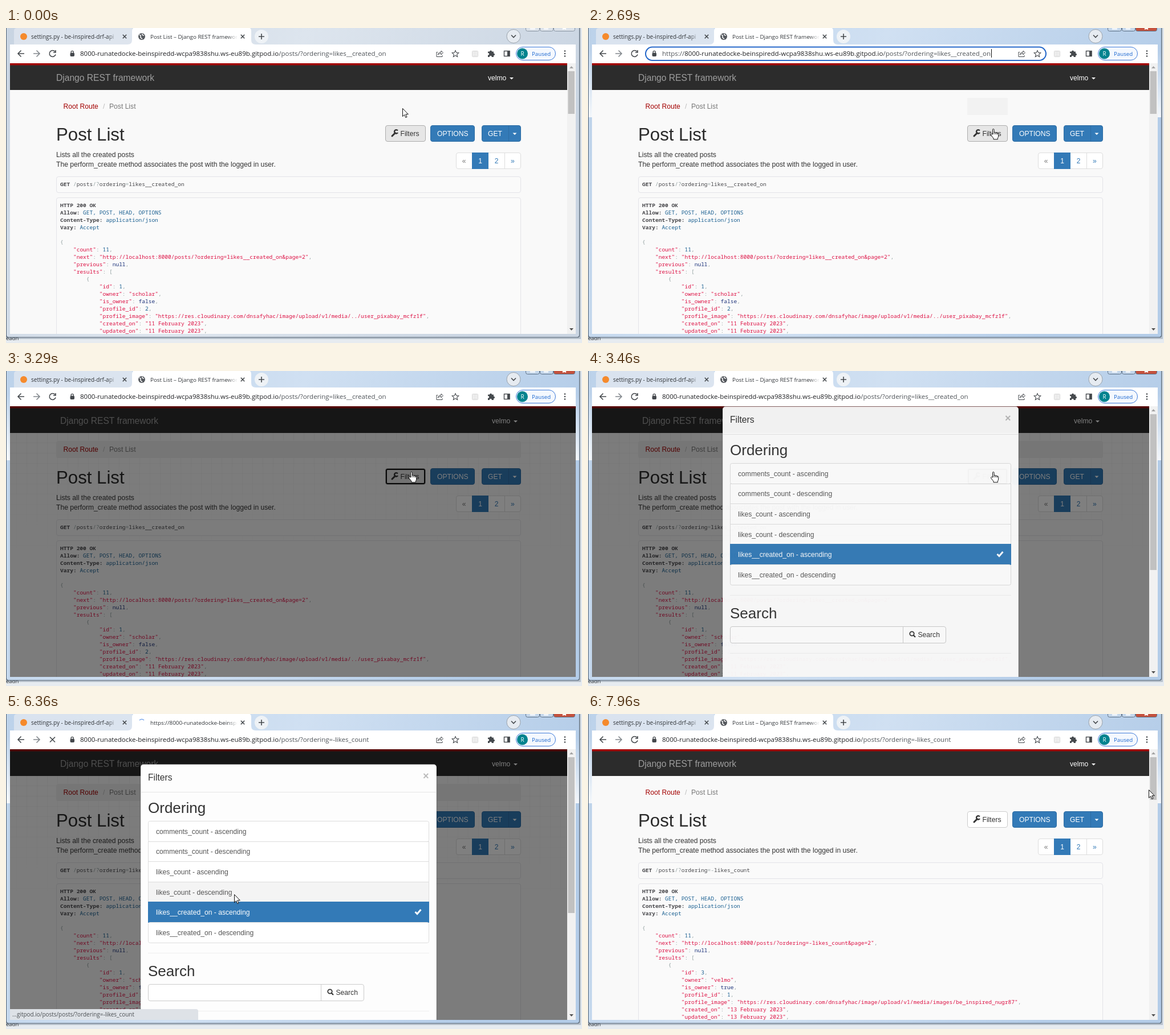
An HTML page that plays this animation: 1010 by 554 pixels, repeating every 8 s.

```html
<!DOCTYPE html>
<html lang="en">
<head>
<meta charset="utf-8">
<title>Post List</title>
<style>
html, body { margin: 0; width: 100%; height: 100%; overflow: hidden; background: #fff; }
svg { display: block; width: 100%; height: 100%; }
text { white-space: pre; font: 12.13px "Liberation Sans", Arial, sans-serif; fill: #333; }
.ui { font-family: "Open Sans", "Noto Sans", sans-serif; fill: #303438; }
.mono { font: 9.56px "Noto Sans Mono", monospace; fill: #48484c; }
.b { font-weight: 700; }
.lit { fill: #195f91; } .pun { fill: #93a1a1; } .str { fill: #d14; } .kwd { fill: #1e347b; }
.ico { fill: none; stroke: #45494d; stroke-width: 1.6; }
</style>
</head>
<body>
<svg id="stage" viewBox="0 0 1010 554" preserveAspectRatio="none"></svg>
<script>
const LOOP = 8000;
const $ = id => document.getElementById(id);
const esc = s => s.replace(/&/g, '&amp;').replace(/</g, '&lt;');
const rect = (x, y, w, h, fill, more = '') =>
  `<rect x="${x}" y="${y}" width="${w}" height="${h}" fill="${fill}" ${more}/>`;
const box = (x, y, w, h, fill, line, r = 3.5, more = '') =>
  rect(x + .5, y + .5, w - 1, h - 1, fill, `stroke="${line}" rx="${r}" ${more}`);
const text = (x, y, s, fill = '#333', size = 12.13, more = '') =>
  `<text x="${x}" y="${y}" style="fill:${fill};font-size:${size}px" ${more}>${esc(s)}</text>`;
const ui = (x, y, s, size, fill = '#303438', more = '') => text(x, y, s, fill, size, `class="ui" ${more}`);
const path = (d, more = 'class="ico"') => `<path d="${d}" ${more}/>`;
const circle = (x, y, r, fill, more = '') => `<circle cx="${x}" cy="${y}" r="${r}" fill="${fill}" ${more}/>`;
const group = (id, inner, more = '') => `<g id="${id}" ${more}>${inner}</g>`;
const cross = (x, y, r) => path(`M${x - r} ${y - r}l${2 * r} ${2 * r}m0 ${-2 * r}l${-2 * r} ${2 * r}`);
const span = (cls, s) => `<tspan class="${cls}">${esc(s)}</tspan>`;

// Colours JSON and request lines by token
function paint(line) {
  return line.replace(/"[^"]*"|\b(?:true|false|null)\b|\b\d+\b|[A-Za-z_]+|[^\w"\s]+|\s+/g, s =>
    s[0] === '"' ? span('str', s) :
    /^(true|false|null)$/.test(s) ? span('kwd', s) :
    /^\d/.test(s) ? span('lit', s) :
    /^[\w\s]/.test(s) ? s : span('pun', s));
}
const mono = (y, inner) => `<text class="mono" x="95" y="${y}" xml:space="preserve">${inner}</text>`;

function listing(p) {
  const pad = n => ' '.repeat(n);
  const json = ['{',
    pad(4) + '"count": 11,',
    pad(4) + `"next": "http://localhost:8000/posts/?ordering=${p.order}&page=2",`,
    pad(4) + '"previous": null,', pad(4) + '"results": [', pad(8) + '{',
    ...[`"id": ${p.id},`, `"owner": "${p.owner}",`, `"is_owner": ${p.own},`, `"profile_id": ${p.profile},`,
      `"profile_image": "https://res.cloudinary.com/dnsafyhac/image/upload/v1/media/${p.image}",`,
      `"created_on": "${p.day} February 2023",`, `"updated_on": "${p.day} February 2023",`].map(s => pad(12) + s)];
  const heads = [['Allow:', 'GET, POST, HEAD, OPTIONS'], ['Content-Type:', 'application/json'], ['Vary:', 'Accept']];
  return mono(278, span('b', 'GET') + paint(` /posts/?ordering=${p.order}`)) +
    mono(315, span('b', 'HTTP 200 OK')) +
    heads.map(([k, v], i) => mono(328 + 13 * i, span('b', k) + ' ' + span('lit', v))).join('') +
    json.map((s, i) => mono(380 + 13 * i, paint(s))).join('');
}

const host = '8000-runatedocke-beinspiredd-wcpa9838shu.ws-eu89b.gitpod.io';
const sorts = ['comments_count', 'likes_count', 'likes__created_on'];
const keys = sorts.flatMap(s => [s, '-' + s]);
const ROW = 35.6, LIST = 188.5;

const fade = (id, x) => `<linearGradient id="${id}" gradientUnits="userSpaceOnUse" x1="${x - 18}" x2="${x}" y1="0" y2="0">
  <stop stop-color="#303438"/><stop offset="1" stop-color="#303438" stop-opacity="0"/></linearGradient>`;
const sheen = (id, a, b, c) => `<linearGradient id="${id}" x2="1" y2=".25">
  <stop stop-color="${a}"/><stop offset=".5" stop-color="${b}"/><stop offset="1" stop-color="${c}"/></linearGradient>`;

const defs = `<defs>${fade('fadeA', 196)}${fade('fadeB', 406)}
  ${sheen('idle', '#c8d4e2', '#dde5ee', '#cad5e2')}${sheen('live', '#bcd2ea', '#d0e0f2', '#b3cce8')}
  <clipPath id="view">${rect(7, 62, 992, 476, '#000')}</clipPath>
  <pattern id="grid" width="18" height="18" patternUnits="userSpaceOnUse">${path('M.5 0V18M0 .5H18', 'stroke="#000" stroke-opacity=".035"')}</pattern>
  <linearGradient id="down" x2="0" y2="1"><stop stop-color="#fff"/><stop offset="1" stop-color="#000"/></linearGradient>
  <linearGradient id="glow" x2="0" y2="1"><stop stop-color="#fff" stop-opacity="0"/><stop offset="1" stop-color="#fff" stop-opacity=".85"/></linearGradient>
  <mask id="gridFade">${rect(7, 109, 992, 215, 'url(#down)')}</mask></defs>`;

const frame = rect(0, 0, 1010, 554, '#e6ebf0') + rect(0, 0, 1008, 547, '#b9c3cd') +
  ui(0, 549, 'eadn', 9.5) +
  rect(0, -5, 1006, 549.5, '#566575', 'rx="4"') +
  rect(1, -5, 1004, 548.5, 'url(#idle)', 'id="glass" rx="4"') +
  group('ctlIdle', [[911, 25], [936, 24], [960, 38]].map(([x, w]) => box(x, -8, w, 14, '#dbe2ea', '#8793a0', 3)).join('')) +
  group('ctlLive', [1, 999].map(x => rect(x, 40, 6, 117, 'url(#glow)')).join('') +
    [[911, 25, '#c3d6eb'], [936, 24, '#c3d6eb'], [960, 38, '#c4513d']]
      .map(([x, w, c]) => box(x, -8, w, 14, c, '#5d7186', 3)).join('')) +
  path('M919 1.5H928M943 1.5H951M976 -1L982 2M982 -1L976 2', 'stroke="#fff" stroke-width="2"');

const tabs = path('M14 29V5Q14 0 20 0H221V29Z', 'fill="#e3e9f0" fill-opacity=".75"') +
  path('M213 29Q221 29 221 21V5Q221 -1 227 -1H424Q430 -1 430 5V21Q430 29 438 29Z', 'fill="#fff"') +
  circle(31, 15, 6, '#f58a2c') +
  ui(44, 18.5, 'settings.py - be-inspired-drf-api', 10, 'url(#fadeA)') + cross(208, 15, 3.2) +
  group('globe', circle(238, 15, 6, '#55595e') + path('M234 12q3 1 2 3t3 4M239 10q-1 3 3 3', 'fill="none" stroke="#fff" stroke-width="1.5"')) +
  group('spin', path('M-4 -4A5.6 5.6 0 0 1 4 -4', 'fill="none" stroke="#7ba7ea" stroke-width="1.5"')) +
  ui(253, 18.5, '', 9.85, 'url(#fadeB)', 'id="title"') + cross(415, 15, 3.2) +
  circle(448, 15, 12, '#eef2f6') + path('M448 10V20M443 15H453') +
  circle(890, 14.5, 12, '#e6ebf1', 'stroke="#8a929b" stroke-width=".8"') + path('M886 12.5L890 16.5L894 12.5');

const toolbar = rect(7, 29, 992, 33, '#fff') +
  path('M32 45H21M26.5 39.5L21 45L26.5 50.5') +
  path('M48 45H59M53.5 39.5L59 45L53.5 50.5', 'class="ico" style="stroke:#83888d"') +
  group('reload', path('M86 41.5A5.5 5.5 0 1 0 87 46.5M87 39V43H83')) +
  group('stop', cross(81.5, 45, 4.5)) +
  rect(101, 33.5, 702, 23.5, '#fff', 'id="ring" rx="11.7" stroke="#2467c9" stroke-width="2"') +
  box(112.5, 43.5, 7.5, 6.5, '#45494d', '#45494d', 1) + path('M114 44V42.5a2.2 2.2 0 0 1 4.4 0V44', 'class="ico" style="stroke-width:1.2"') +
  rect(130, 36, 0, 19, '#92bff2', 'id="sel"') +
  '<text id="url" class="ui" x="130" y="49" style="font-size:11.53px"><tspan id="scheme" style="fill:#50555a"></tspan>' +
  `<tspan style="fill:#202124">${host}</tspan><tspan id="query" style="fill:#50555a"></tspan></text>` +
  rect(0, 37, 1, 15, '#111', 'id="caret"') +
  path('M757 42.5H755V50.5H765V48M757.5 47Q758 42.5 763 42.5V40L766.5 43.5L763 47V44.5Q759.5 44.5 757.5 47Z', 'class="ico" style="stroke-width:1"') +
  path('M788 39.5L789.7 43.3L793.8 43.7L790.7 46.4L791.6 50.5L788 48.3L784.4 50.5L785.3 46.4L782.2 43.7L786.3 43.3Z', 'class="ico" style="stroke-width:1.1"') +
  box(817, 40, 11, 11, '#f3f3f3', '#d5d5d5', 1) + path('M819 42.5H826M819 45.5H826M819 48.5H826', 'stroke="#dcdcdc"') +
  path('M845 41.5H848A2 2 0 1 1 852 41.5H855V44.5A2 2 0 1 1 855 48.5V51H851.5A1.8 1.8 0 1 0 848 51H845V47.5A1.8 1.8 0 1 0 845 44Z', 'fill="#45494d"') +
  rect(873.5, 40.5, 9.5, 9, '#fff', 'class="ico" style="stroke-width:1.4"') + rect(879, 40, 4.5, 10, '#45494d') +
  box(894, 33, 70, 24, '#f4f8fe', '#3b78d8', 11.5) + circle(905.5, 45, 9.5, '#00838f') +
  ui(902.6, 48.6, 'R', 10, '#fff') + ui(922, 48.6, 'Paused', 9.7, '#1a66d0') +
  [40.5, 45, 49.5].map(y => circle(980, y, 1.3, '#45494d')).join('');

const wrench = path('M677 190L682.5 184.5', 'stroke="#333" stroke-width="3" stroke-linecap="round"') +
  path('M686.8 180.4A3.2 3.2 0 1 0 687 184', 'fill="none" stroke="#333" stroke-width="2.4"');
const triangle = (x, y, c) => path(`M${x} ${y}h7l-3.5 3.6z`, `fill="${c}"`);
const pages = ['«', '1', '2', '»'].map((s, i) => {
  const on = i === 1;
  return (on ? rect(817, 219, 29, 29, '#337ab7') : '') +
    text(803.2 + 28.4 * i, 237.6, s, on ? '#fff' : i ? '#337ab7' : '#777', 12.13, 'text-anchor="middle"');
}).join('');

const page = rect(7, 62, 992, 476, '#f9f9f9') +
  rect(7, 109, 992, 215, 'url(#grid)', 'id="lines" mask="url(#gridFade)"') +
  rect(7, 62, 992, 47, '#2c2c2c') + rect(7, 62, 992, 3.5, '#a30000') +
  group('nav', text(88, 93, 'Django REST framework', '#9d9d9d', 15.6) + text(845, 92, 'velmo', '#fff') + triangle(883, 87, '#fff')) +
  rect(88, 123, 815, 30, '#ededed', 'id="crumbs" rx="3.5"') + rect(665, 123, 71, 30, '#f2f2f2', 'id="crumbPart"') +
  text(100.5, 142, 'Root Route', '#a30000') + text(170, 142, '/', '#bbb') + text(181, 142, 'Post List', '#777') +
  text(88, 198.2, 'Post List', '#2a2a2a', 31.2) +
  text(88, 227, 'Lists all the created posts') +
  text(88, 244.4, 'The perform_create method associates the post with the logged in user.') +
  box(665, 171, 71, 29, '#fff', '#ccc', 3.5, 'id="filters"') + wrench + text(691.5, 190, 'Filters') +
  rect(667, 173, 67, 25, 'none', 'id="press" rx="2" stroke="#111" stroke-width="2"') +
  box(744, 171, 78, 29, '#337ab7', '#2e6da4') + text(756, 190, 'OPTIONS', '#fff') +
  box(834, 171, 69, 29, '#337ab7', '#2e6da4') + text(845, 190, 'GET', '#fff') +
  path('M881.5 171V200', 'stroke="#2e6da4"') + triangle(888.5, 184.5, '#fff') +
  box(789, 219, 114, 29, '#fff', '#ddd') + path('M874.5 219V248', 'stroke="#ddd"') + pages +
  box(88, 261, 815, 29, '#fafafa', '#e3e3e8') + box(88, 298, 815, 260, '#fafafa', '#e3e3e8') +
  group('before', listing({ order: 'likes__created_on', id: 1, owner: 'scholar', own: 'false', profile: 2, image: '../user_pixabay_mcfz1f', day: 11 })) +
  group('after', listing({ order: '-likes_count', id: 3, owner: 'velmo', own: 'true', profile: 1, image: 'images/be_inspired_nugr87', day: 13 })) +
  rect(7, 62, 992, 476, '#000', 'id="dim"');

const rows = keys.map((k, i) => {
  const y = LIST + ROW * i, on = i === 4;
  return rect(249.5, Math.floor(y) + .5, 492, 36, on ? '#337ab7' : '#fff', `id="row${i}" stroke="${on ? '#337ab7' : '#ddd'}" ${i % 5 ? '' : 'rx="3"'}`) +
    text(263, y + 22.3, `${k.replace('-', '')} - ${i % 2 ? 'descending' : 'ascending'}`, on ? '#fff' : '#555');
}).join('');
const modal = rect(236, 88.5, 519, 480, '#fdfdfd', 'rx="5" stroke="#000" stroke-opacity=".2"') +
  text(249, 117, 'Filters', '#333', 15.6) + text(731, 115, '×', '#bbb', 18.2, 'class="b"') +
  rect(236, 137, 519, 1, '#e5e5e5') + text(249, 174, 'Ordering', '#333', 26) + rows +
  path('M717.5 348L721 351.5L727.5 344', 'fill="none" stroke="#fff" stroke-width="3"') +
  rect(249, 420, 493, 1, '#eee') + text(249, 461, 'Search', '#333', 26) +
  box(249, 475, 379, 30, '#fff', '#ccc') + path('M552.5 475V505', 'stroke="#ccc"') +
  circle(568, 488, 3.7, 'none', 'stroke="#333" stroke-width="1.8"') + path('M570.5 490.5L574 494', 'stroke="#333" stroke-width="2.2"') +
  text(578.5, 494, 'Search') + rect(249, 522, 493, 1, '#eee');

const bar = rect(984, 62, 15, 476, '#f1f1f1') + rect(985.5, 76, 11.5, 75, '#c1c1c1', 'id="thumb"') +
  path('M988 71h7l-3.5 -4z', 'fill="#a3a3a3"') + path('M988 528h7l-3.5 4z', 'fill="#505050"');
const status = path('M7 519H333Q337 519 337 523V538H7Z', 'fill="#dee2e7"') + ui(11, 532.3, '', 9.95, '#4a4e52', 'id="link"');

const shapes = {
  arrow: path('M.5 .5V14.6L3.7 11.5L5.8 16.5L8 15.6L5.9 10.7H10.3Z', 'fill="#fff" stroke="#111"'),
  beam: path('M-3.5 -7.5H-1Q0 -7.5 0 -6.5V6.5Q0 7.5 -1 7.5H-3.5M3.5 -7.5H1Q0 -7.5 0 -6.5M0 6.5Q0 7.5 1 7.5H3.5', 'fill="none" stroke="#111" stroke-width="1.2"'),
  hand: path('M3.5 10V1.8Q3.5 .5 4.7 .5T6 1.8V6.5Q8.4 5.8 8.8 7.2Q11 6.4 11.4 8Q13.6 7.6 13.7 9.4V13Q13.7 15 12.4 16.5V18.8H5V16.8L.9 11.8Q0 9.8 1.5 9.2Q2.8 9 3.5 10.5M6 6.5V10M8.8 7.2V10M11.4 8V10.5', 'fill="#fff" stroke="#111"'),
};

$('stage').innerHTML = defs + frame + tabs + toolbar +
  group('content', page + group('modal', modal) + group('bar', bar) + group('status', status), 'clip-path="url(#view)"') +
  group('pointer', Object.keys(shapes).map(k => group(k, shapes[k])).join(''));

// start, end, steps, x, y, shape
const moves = [
  [50, 140, 2, 688, 73, 'arrow'], [330, 390, 2, 690, 62, 'arrow'], [440, 500, 2, 690, 49, 'beam'],
  [2280, 2500, 5, 711, 215, 'arrow'], [2560, 2690, 3, 706, 177, 'hand'],
  [4000, 4000, 1, 702, 177, 'arrow'], [4060, 4230, 4, 529, 270, 'hand'], [4480, 5190, 13, 396, 317, 'hand'],
  [6240, 6240, 1, 400, 317, 'arrow'], [6940, 7120, 4, 820, 263, 'arrow'], [7360, 7960, 10, 983, 133, 'arrow'],
];
function pointerAt(t) {
  let x = 695, y = 141, shape = 'arrow';
  for (const [a, b, n, tx, ty, s] of moves) {
    if (t < a) break;
    const k = b > a ? Math.min(n - 1, Math.floor((t - a) / (b - a) * (n - 1) + 1e-6)) : 0;
    x += (tx - x) * (k + 1) / n;
    y += (ty - y) * (k + 1) / n;
    shape = s;
  }
  return { x, y, shape };
}

const at = (table, t) => table.reduce((v, [time, ...rest]) => t >= time ? rest : v, null);
const dimSteps = [[0, 0], [3100, .17], [3190, .35], [3290, .5], [6600, 0]];
const modalSteps = [[0, 0, 0], [3370, .45, -72], [3450, .95, -26], [3520, 1, -7], [3600, 1, 0], [6600, 0, 0]];
const show = (id, on) => { $(id).style.display = on ? '' : 'none'; };
const set = (id, name, v) => $(id).setAttribute(name, v);

function render(t) {
  const within = (a, b) => t >= a && t < b;
  const live = t >= 780, focus = within(780, 3020), typed = within(1590, 3020);
  const dimmed = within(3100, 6600), loaded = t >= 6600, busy = within(6240, 6890);
  const order = t >= 6240 ? '-likes_count' : 'likes__created_on';

  set('glass', 'fill', live ? 'url(#live)' : 'url(#idle)');
  show('ctlLive', live);
  show('ctlIdle', !live);
  show('globe', !busy);
  show('spin', busy);
  set('spin', 'transform', `translate(238 15) rotate(${Math.floor((t - 6240) / 60) * 50 - 100})`);
  show('stop', busy);
  show('reload', !busy);
  $('title').textContent = within(6240, 6600) ? 'https://' + host : 'Post List – Django REST framework';

  show('ring', focus);
  $('scheme').textContent = typed ? 'https://' : '';
  $('query').textContent = '/posts/?ordering=' + order;
  const width = $('url').getComputedTextLength();
  show('sel', within(780, 1590));
  set('sel', 'width', width);
  show('caret', within(1590, 2100) || within(2610, 3020));
  set('caret', 'x', Math.round(131 + width));

  const hover = t < 50 || within(2560, 4000);
  set('filters', 'fill', hover ? '#e6e6e6' : '#fff');
  set('filters', 'stroke', hover ? '#adadad' : '#ccc');
  show('press', within(3020, 6600));
  show('crumbs', dimmed);
  show('lines', dimmed);
  show('crumbPart', within(2340, 3100));
  set('nav', 'transform', `translate(${dimmed ? 7 : 0} 0)`);
  show('before', !loaded);
  show('after', loaded);
  set('dim', 'opacity', at(dimSteps, t)[0]);

  const [alpha, dy] = at(modalSteps, t);
  show('modal', alpha > 0);
  set('modal', 'opacity', alpha);
  set('modal', 'transform', `translate(0 ${dy})`);
  set('row3', 'fill', t >= 6130 ? '#f4f4f4' : '#fff');
  show('bar', !within(3100, 3370));
  set('thumb', 'height', alpha ? 274 : 75);

  const p = pointerAt(t);
  show('status', within(3520, 6600));
  $('link').textContent = '...gitpod.io/posts/posts/?ordering=' + (keys[Math.floor((p.y - LIST) / ROW)] || keys[4]);
  for (const k in shapes) show(k, k === p.shape);
  set('pointer', 'transform', `translate(${Math.round(p.x)} ${Math.round(p.y)})`);
}

const start = performance.now();
function tick() {
  render((performance.now() - start) % LOOP);
  requestAnimationFrame(tick);
}
tick();
</script>
</body>
</html>
```
